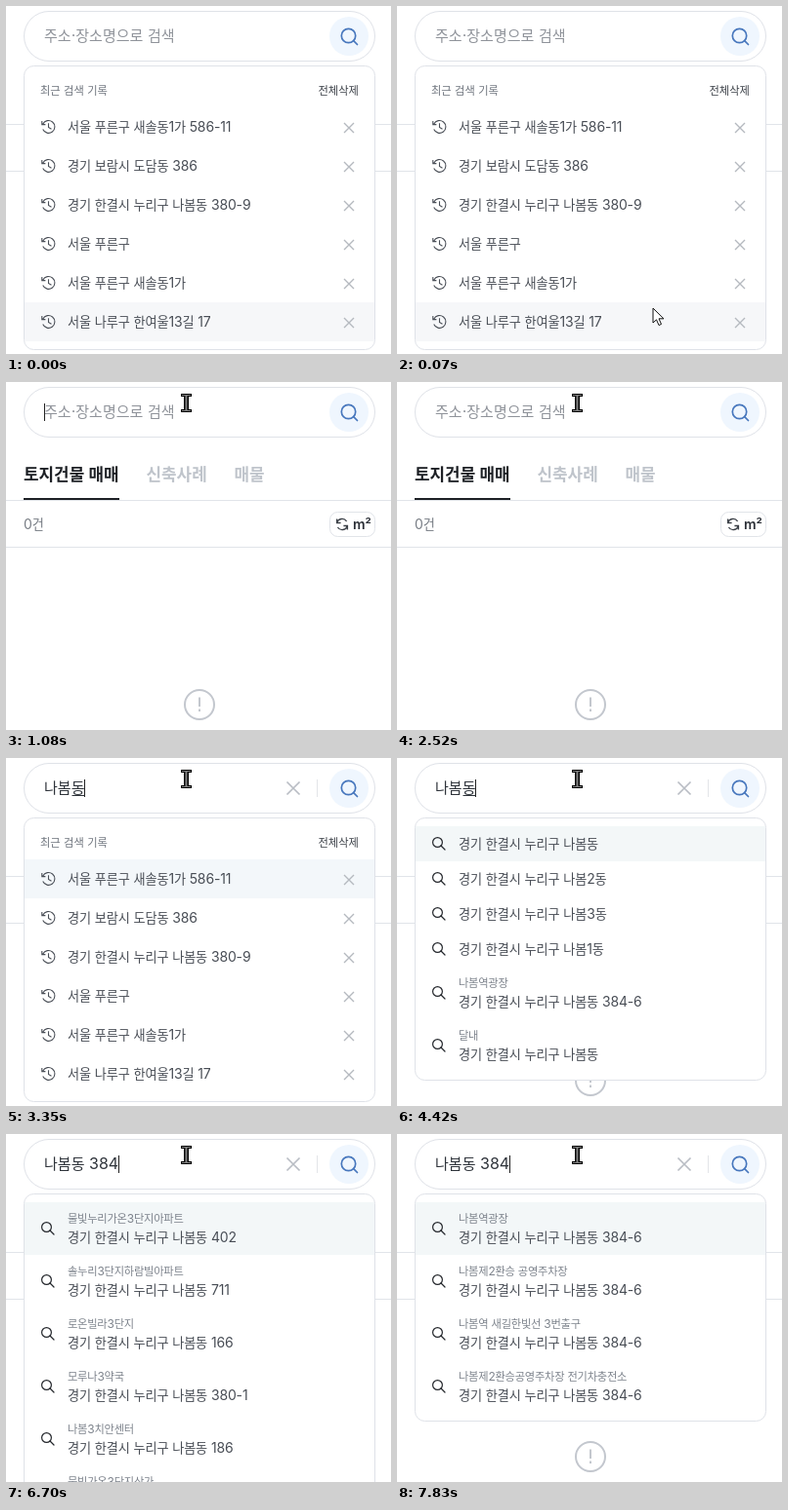
Write an HTML page that moves like this. It is 394 px wide and 357 px high and loops after 8000 ms.

```html
<!DOCTYPE html>
<html lang="ko">
<meta charset="utf-8">
<title>주소 검색</title>
<style>
  html, body { margin: 0; width: 394px; height: 357px; overflow: hidden; background: #fff; }
  svg { display: block; fill: none; }
  text { font-family: Inter, "Noto Sans CJK KR", "Noto Sans CJK", sans-serif; white-space: pre; }
  .ko { font-size: .94em; }
  .address { letter-spacing: -.01em; }
  .place { letter-spacing: -.02em; }
</style>
<svg id="stage" width="394" height="357" viewBox="0 0 394 357"></svg>
<script>
const LOOP = 8000;
const stage = document.getElementById('stage');

// Hangul runs are set slightly smaller than Latin and digits
const text = (x, y, size, color, str, extra = '') =>
  `<text x="${x}" y="${y}" font-size="${size}" fill="${color}" ${extra}>` +
  str.replace(/[\u3131-\uD7A3]+/g, s => `<tspan class="ko">${s}</tspan>`) + '</text>';
const addressText = (y, str) => text(63, y, 14, '#484d55', str, 'class="address"');
const path = (d, color, width = 1, extra = '') =>
  `<path d="${d}" stroke="${color}" stroke-width="${width}" ${extra}/>`;
const box = (x, y, w, h, r, color, fill = '#fff') =>
  `<rect x="${x}" y="${y}" width="${w}" height="${h}" rx="${r}" stroke="${color}" fill="${fill}"/>`;
const cross = (x, y, r, color, width) =>
  path(`M${x - r} ${y - r}l${2 * r} ${2 * r}m0 ${-2 * r}l${-2 * r} ${2 * r}`, color, width);
const lens = (x, y, r, tail, color, width) =>
  `<circle cx="${x}" cy="${y}" r="${r}" stroke="${color}" stroke-width="${width}"/>` +
  path(`M${x + r * .72} ${y + r * .72}l${tail} ${tail}`, color, width, 'stroke-linecap="round"');
const clock = y =>
  path(`M37.7 ${y + 2.6}A6.4 6.4 0 1 0 37.8 ${y - 3}M36.8 ${y - 6}v3.6h3.6M43.5 ${y - 3.8}v4.2l3 1.8`, '#4a4f57', 1.1);

const REGION = '경기 한결시 누리구 나봄';
const history = [
  '서울 푸른구 새솔동1가 586-11', '경기 보람시 도담동 386', REGION + '동 380-9',
  '서울 푸른구', '서울 푸른구 새솔동1가', '서울 나루구 한여울13길 17'
];
// Each suggestion is [address] or [address, place name]
const town = s => [REGION + s];
const place = (name, lot) => [REGION + '동' + lot, name];
const nearby = [place('나봄역광장', ' 384-6'), place('달내', '')];
const suggestions = [
  [3650, [...['동', '2동', '3동', '1동'].map(town), ...nearby]],
  [5640, [...['2동', '동', '1동', '3동'].map(town), ...nearby]],
  [6020, [
    place('물빛누리가온3단지아파트', ' 402'), place('솔누리3단지하람빌아파트', ' 711'),
    place('로온빌라3단지', ' 166'), place('모루나3약국', ' 380-1'),
    place('나봄3치안센터', ' 186'), place('물빛가온3단지상가', ' 402')
  ]],
  [7150, ['나봄역광장', '나봄제2환승 공영주차장', '나봄역 새길한빛선 3번출구',
    '나봄제2환승공영주차장 전기차충전소'].map(n => place(n, ' 384-6'))]
];
const typing = [
  [0, ''], [2670, 'ㄴ'], [2820, '나'], [2900, '나보'], [3050, '나봄'], [3200, '나봄ㄷ'],
  [3275, '나봄도'], [3350, '나봄동'], [5100, '나봄동 '], [5570, '나봄동 3'],
  [6550, '나봄동 38'], [6700, '나봄동 384']
];
const blinks = [
  [0, 0], [910, 1], [1440, 0], [1970, 1], [2520, 0], [2670, 1], [3880, 0], [4420, 1],
  [4950, 0], [5100, 1], [6170, 0], [6550, 1], [7300, 0], [7830, 1]
];
// Pointer position and hovered row
const moves = [
  [0, null], [70, [262, 310, 5]], [148, [240, 232, 3]], [226, [217, 146, 1]],
  [304, [190, 108, 0]], [382, [177, 75, 0]], [460, [184, 21, 0]]
];
const at = (keys, t) => keys.findLast(k => k[0] <= t)?.[1];

const page =
  path('M0 121.5H394M0 169.5H394', '#e1e4e9') +
  text(18, 101, 18, '#1d2025', '토지건물 매매', 'font-weight="700"') +
  text(143.5, 101, 18, '#bfc4cb', '신축사례', 'font-weight="700"') +
  text(233.5, 101, 18, '#bfc4cb', '매물', 'font-weight="700"') +
  path('M18 120H116', '#1d2025', 2) +
  text(18, 151, 14, '#777c84', '0건') +
  box(331.5, 133.5, 46, 25, 8, '#e1e4e9') +
  path('M338.6 144.5A5.5 5.5 0 0 1 348.6 143M338.6 140.5v4h4M349.4 147.5A5.5 5.5 0 0 1 339.4 149M349.4 151.5v-4h-4', '#3c4148', 1.4) +
  text(355, 151, 14, '#2b2f36', 'm²', 'font-weight="600"') +
  '<circle cx="198" cy="331" r="15" stroke="#c3c7ce" stroke-width="2"/>' +
  path('M198 323.5v9.5m0 2.5v2.5', '#c3c7ce', 2);

const field =
  box(18.5, 5.5, 359, 51, 25.5, '#dfe2e8') +
  '<circle cx="351" cy="31" r="20" fill="#eff6fe"/>' +
  lens(350.5, 30.5, 7.2, 3.8, '#4777bd', 1.7);

const hover = (y, h, color = '#f3f7fa') => `<rect x="19" y="${y}" width="358" height="${h}" fill="${color}"/>`;

function historyList(row, color) {
  return box(18.5, 61.5, 359, 291, 10, '#dfe2e8') + hover(104 + row * 40, 40, color) +
    text(35, 91, 12, '#6f757e', '최근 검색 기록') + text(319.5, 91, 12, '#3c4148', '전체삭제') +
    history.map((s, i) => {
      const y = 124 + i * 40;
      return clock(y) + addressText(y + 5, s) + cross(351, y + 1, 5, '#b5b9bf', 1.4);
    }).join('');
}

function suggestionList(items) {
  let y = 70, rows = '';
  for (const [address, name] of items) {
    const h = name ? 54 : 36;
    if (y === 70) rows += hover(y, h, '#f3f7f8');
    rows += lens(41.5, y + h / 2 - 1.5, 4.9, 4, '#24272c', 1.2);
    if (name) rows += text(63, y + 21, 12, '#7d838c', name, 'class="place"');
    rows += addressText(y + h - 13, address);
    y += h;
  }
  return box(18.5, 61.5, 359, y + 8 - 61, 10, '#dfe2e8') + rows;
}

function list(t, spot) {
  if (t >= 3650) return suggestionList(at(suggestions, t));
  if (t >= 1080 && t < 2670) return '';
  const fading = t >= 995 && t < 1080;
  const row = spot ? spot[2] : 5;
  return `<g opacity="${fading ? .5 : 1}">${historyList(row, row === 5 ? '#f6f7f9' : '#f3f7fa')}</g>`;
}

function pointer(t, spot) {
  if (!spot) return '';
  const [x, y] = spot;
  if (t < 460) {
    return `<path transform="translate(${x} ${y})" d="M0 0V15L3.5 11.8L6 17.5L8.5 16.4L6 10.8H11Z" fill="#fff" stroke="#111"/>`;
  }
  const bars = 'M179 13.5h11M179 29.5h11', stem = 'M184.5 13v17';
  const fill = t >= 680 && t < 910 ? '#f4733f' : '#808080';
  return path(bars, '#000', 3) + path(stem, '#000', 5) +
    path('M180 13.5h9M180 29.5h9', fill) + path(stem, fill, 2);
}

function entry(t) {
  const value = at(typing, t);
  if (!value) return text(39, 36, 16, '#8f939a', '주소·장소명으로 검색');
  return text(39, 36, 16, '#2f343b', value, 'id="value"') +
    cross(294, 31, 6.5, '#b9bdc4', 1.7) + path('M318.5 22V40', '#e3e5e9');
}

function caret(t) {
  const value = document.getElementById('value');
  const x = Math.floor(39 + (value ? value.getComputedTextLength() : 0)) + .5;
  const composing = value && t < 5100;
  return (at(blinks, t) ? path(`M${x} 22V40`, '#222') : '') +
    (composing ? path(`M${x - 13} 38.5H${x}`, '#2f343b') : '');
}

let last;
function frame(now) {
  const t = now % LOOP;
  const spot = at(moves, t);
  const scene = page + field + entry(t) + list(t, spot) + pointer(t, spot);
  const key = scene + at(blinks, t) + (t < 5100);
  if (key !== last) {
    last = key;
    stage.innerHTML = scene;
    stage.insertAdjacentHTML('beforeend', caret(t));
  }
  requestAnimationFrame(frame);
}
requestAnimationFrame(frame);
</script>
</html>
```
